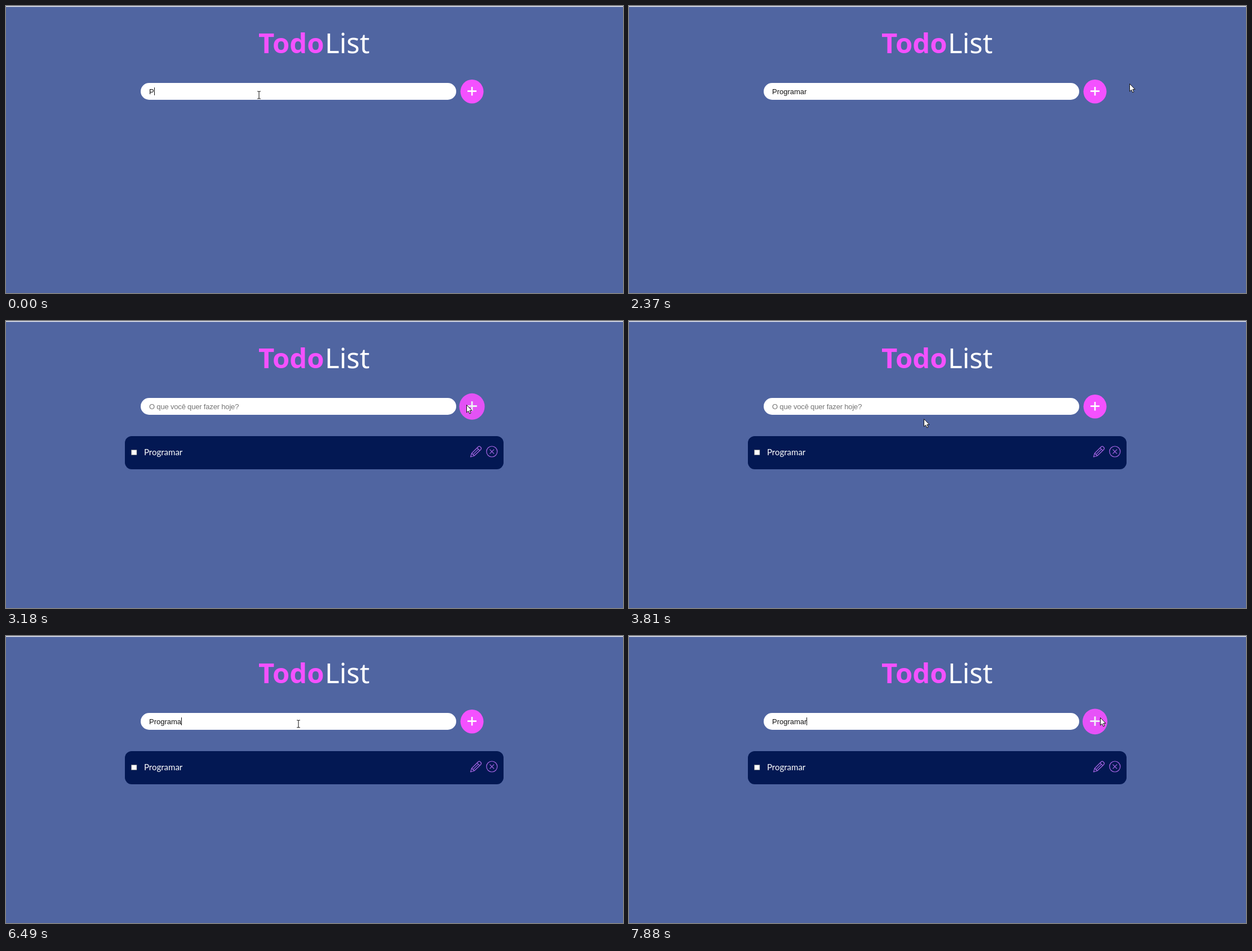
An HTML page for the animation above (8000 ms loop, 1095 px wide and 511 px high).

```html
<!DOCTYPE html>
<html lang="pt">
<head>
<meta charset="utf-8">
<title>TodoList</title>
<style>
  html, body { margin: 0; width: 100%; height: 100%; overflow: hidden; background: #5065a1; }
  svg { display: block; }
  .title { font: 49px "Noto Sans", sans-serif; fill: #fff; }
  .title .bold { font-weight: 700; fill: #f451ff; }
  .field { font: 13px "Liberation Sans", Arial, sans-serif; fill: #111; }
  .hint { fill: #757575; letter-spacing: -.18px; }
  .task { font: 15px Lato, sans-serif; fill: #fff; }
  .icons { fill: none; stroke: #a866e6; stroke-width: 1.2; stroke-linejoin: round; }
</style>
</head>
<body>
<svg width="1095" height="511" viewBox="0 0 1095 511">
  <rect width="1095" height="511" fill="#5065a1"/>
  <rect width="1095" height="1.4" fill="#f4f4f6"/>
  <text class="title" y="84"><tspan class="bold" x="448">Todo</tspan><tspan x="566">List</tspan></text>

  <rect x="239" y="137" width="560" height="30" rx="15" fill="#fff"/>
  <text id="hint" class="field hint" x="254" y="156.5">O que você quer fazer hoje?</text>
  <text id="typed" class="field" x="254" y="156.5"></text>
  <rect id="caret" y="145" width="1" height="14" fill="#111"/>

  <g id="button">
    <ellipse rx="20.5" ry="21.3" fill="#f451ff"/>
    <path d="M-8 -.7H8M0 -8.4V7.2" stroke="#fff" stroke-width="2.6"/>
  </g>

  <g id="card">
    <rect x="211" y="205" width="672" height="59" rx="12" fill="#031853"/>
    <rect x="222.5" y="229.5" width="9.5" height="9" fill="#fff" stroke="#767676" stroke-width=".6"/>
    <text class="task" x="245" y="238.5">Programar</text>
    <g class="icons">
      <path d="M824.5 242L826.5 235.5L838 224Q840 222.300 842 224.300Q844.500 226.500 842.800 228.700L831 240Z
               M826.500 235.500L831 240M836 226L840.700 230.700M828.800 237.800L838.300 228.300"/>
      <circle cx="862.3" cy="232.5" r="9.5"/>
      <path d="M858.500 228.700L866.100 236.300M866.100 228.700L858.500 236.300"/>
    </g>
  </g>

  <path id="arrow" d="M.5 .5V14L3.600 11.200L5.800 16L8 15L5.900 10.400H10Z" fill="#fff" stroke="#111"/>
  <path id="beam" d="M-3 -6.500H-1L0 -5.500L1 -6.500H3M0 -5.500V5.500M-3 6.500H-1L0 5.500L1 6.500H3" fill="none" stroke="#222" stroke-width="1.1"/>
</svg>
<script>
const LOOP = 8000, WORD = "Programar";
const $ = id => document.getElementById(id);

// [time, letters in the field]
const typing = [
  [0, 1], [120, 2], [240, 3], [560, 4], [730, 5], [900, 6], [1070, 7], [1230, 8], [1760, 9],
  [3180, 0], [5370, 1], [5510, 2], [5650, 3], [5790, 4], [6070, 5], [6340, 6], [6490, 8], [6800, 9]
];
// [time, caret on]
const blink = [[0, 1], [2220, 0], [4510, 1], [5060, 0], [5370, 1], [7370, 0], [7880, 1]];
// [time, x, y, shape, hover amount]
const pointer = [
  [0, 449, 158.5, "beam", 0], [2220, 760, 146, "beam", 0], [2370, 888, 138, "arrow", 0],
  [2520, 900, 142, "arrow", 0], [2640, 874, 147, "arrow", 0], [2790, 838, 150, "arrow", .5],
  [2910, 822, 149, "arrow", 1], [3060, 817, 149, "arrow", 1], [3330, 792, 160, "arrow", .5],
  [3450, 722, 182, "arrow", 0], [3570, 630, 194, "arrow", 0], [3690, 560, 187, "arrow", 0],
  [3810, 523, 174, "arrow", 0], [3960, 520, 161, "beam", 0], [4080, 519, 156.5, "beam", 0],
  [7220, 548, 154, "beam", 0], [7370, 640, 145, "beam", 0], [7490, 735, 122, "arrow", 0],
  [7610, 800, 119, "arrow", 0], [7760, 829, 134, "arrow", .4], [7880, 836, 145, "arrow", .75]
];

const at = (cues, t) => cues.findLast(c => c[0] <= t);
const show = (el, on) => el.setAttribute("visibility", on ? "visible" : "hidden");

function draw(t) {
  const letters = at(typing, t)[1];
  $("typed").textContent = WORD.slice(0, letters);
  show($("hint"), !letters);
  $("caret").setAttribute("x", Math.round(254 + $("typed").getComputedTextLength()));
  show($("caret"), at(blink, t)[1]);
  show($("card"), t >= 3180);

  const [, x, y, shape, hover] = at(pointer, t);
  for (const id of ["arrow", "beam"]) show($(id), id === shape);
  $(shape).setAttribute("transform", `translate(${x} ${y})`);
  $("button").setAttribute("transform", `translate(827 152.300) scale(${1 + .1 * hover})`);
  $("button").setAttribute("opacity", 1 - .1 * hover);
}

function tick() {
  draw(performance.now() % LOOP);
  requestAnimationFrame(tick);
}
tick();
</script>
</body>
</html>
```
